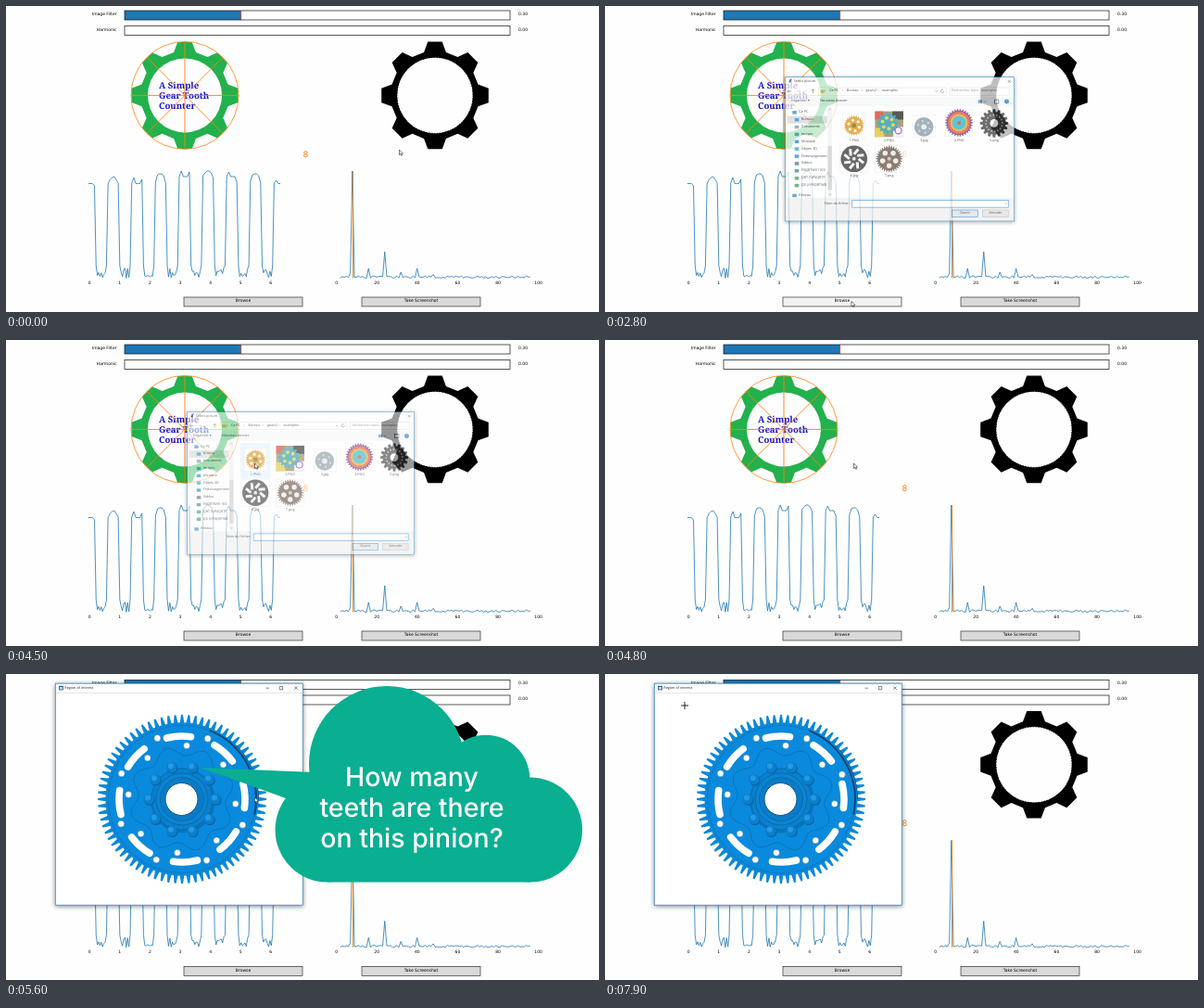
Animation of 640 by 330 pixels, one loop 8 s. Source, as an HTML page:

```html
<!DOCTYPE html>
<html lang="en">
<head>
<meta charset="utf-8">
<title>Gear tooth counter</title>
<style>
  html, body { margin: 0; width: 100%; height: 100%; overflow: hidden; background: #fefefe; }
  svg { display: block; width: 100%; height: 100%; }
  text { dominant-baseline: central; text-rendering: geometricPrecision; }
  .plot { font: 4.5px "DejaVu Sans", sans-serif; }
  .ui { font: 3.8px "Open Sans", sans-serif; fill: #222; }
  .mid { text-anchor: middle; }
  .end { text-anchor: end; }
  .logo { font: 900 9.6px "Noto Serif", serif; fill: #1414c4; }
  .speech { font: 500 28.5px Inter, sans-serif; fill: #fff; text-anchor: middle; }
  .shadow { filter: drop-shadow(.6px 1.2px 2.4px #0007); }
</style>
</head>
<body>
<svg id="stage" viewBox="0 0 640 330"></svg>
<script>
const BLUE = '#1f77b4', ORANGE = '#ff7f0e', GEAR = '#0b88d8', DEEP = '#0a65a8';

// Shape helpers, each returning SVG markup
const range = n => [...Array(n).keys()];
const each = (n, draw) => range(n).map(draw).join('');
const rand = i => { const s = Math.sin(i * 127.1 + 3) * 43758.5; return s - Math.floor(s); };
const polar = (x, y, r, deg) => {
  const a = deg * Math.PI / 180;
  return [x + r * Math.cos(a), y + r * Math.sin(a)].map(v => +v.toFixed(2));
};
const text = (x, y, s, cls, more = '') => `<text x="${x}" y="${y}" class="${cls}" ${more}>${s}</text>`;
const rect = (x, y, w, h, fill, more = '') =>
  `<rect x="${x}" y="${y}" width="${w}" height="${h}" fill="${fill}" ${more}/>`;
const disc = (x, y, r, fill, more = '') => `<circle cx="${x}" cy="${y}" r="${r}" fill="${fill}" ${more}/>`;
const path = (d, fill, stroke = 'none', width = .6, more = '') =>
  `<path d="${d}" fill="${fill}" stroke="${stroke}" stroke-width="${width}" ${more}/>`;
const line = (points, stroke, width) => path('M' + points.join('L'), 'none', stroke, width, 'stroke-linejoin="round"');
const outline = (color, width = .6) => `stroke="${color}" stroke-width="${width}"`;
const arc = (x, y, r, from, to) => `M${polar(x, y, r, from)}A${r} ${r} 0 0 1 ${polar(x, y, r, to)}`;

// base and tip are half tooth widths as fractions of the pitch
function gear(x, y, teeth, root, top, base, tip, fill) {
  const pitch = 360 / teeth;
  const points = range(teeth).flatMap(i =>
    [[root, -base], [top, -tip], [top, tip], [root, base]].map(([r, f]) => polar(x, y, r, (i + f) * pitch)));
  return path(`M${points.join('L')}Z`, fill);
}

function slider(y, label, value, fraction) {
  const end = 128 + 416 * fraction;
  return rect(128, y, 416, 10, '#fff') +
    rect(128, y, 416 * fraction, 10, BLUE) +
    (fraction ? line([[end, y], [end, y + 10]], '#e02010', .7) : '') +
    rect(128, y, 416, 10, 'none', outline('#111', .7)) +
    text(119.5, y + 4.5, label, 'plot end') + text(553, y + 4.5, value, 'plot');
}

const button = (x, label, id) =>
  rect(x, 314, 128, 10, '#d9d9d9', `id="${id}" ${outline('#111')}`) + text(x + 64, 318.8, label, 'plot mid');

function toothSignal() {
  const tops = [
    [0, 0, 191.5, 191.5, 191.5, 194], [192, 187, 185, 184, 187, 191], [191, 185, 191.5, 191.5, 191.5, 187],
    [190, 182, 181, 181, 183, 191], [184, 178, 184, 184, 184, 179], [183, 180, 178, 178, 180, 185],
    [184, 179, 184, 184, 184, 190], [189, 182, 181, 181, 183, 191], [191, 188, 191.5, 191.5, 0, 0]];
  const period = 204.9 / 8;
  return tops.flatMap((ys, k) => {
    const x = 90 + k * period;
    const high = ys.map((y, j) => [x + (j - 2.5) * 2.2, y]).filter(p => p[1]);
    const low = k === 8 ? [] : range(9).map(j =>
      [x + period / 2 + (j - 4) * 1.4, j % 8 ? 282 + 11.5 * rand(k * 9 + j) : 280]);
    return [...high, ...low];
  });
}

function spectrum() {
  const spikes = { 7: 5, 8: 115.5, 16: 10.5, 24: 28.5, 32: 6.5, 40: 10.5, 48: 4 };
  return range(95).map(i => [356.4 + (i + 2) * 2.181, 293.5 - (spikes[i + 2] ?? 2.6 * rand(i) ** 1.5)]);
}

function page() {
  const [lx, rx, y] = [193, 463, 96.4];
  return slider(5, 'Image Filter', '0.30', .302) + slider(21.6, 'Harmonic', '0.00', 0) +
    gear(lx, y, 8, 48, 58, .32, .17, '#22b14c') + disc(lx, y, 40, '#fefefe') +
    text(165, 85.5, 'A Simple', 'logo') + text(165, 96.3, 'Gear Tooth', 'logo') + text(165, 107, 'Counter', 'logo') +
    disc(lx, y, 58, 'none', outline(ORANGE, .8)) +
    each(8, i => line([[lx, y], polar(lx, y, 58, i * 45)], ORANGE, .9)) +
    gear(rx, y, 8, 48, 58.3, .32, .17, '#000') +
    disc(rx, y, 41, '#fefefe', outline('#000', .9) + ' stroke-dasharray="1.6 1.3"') +
    text(323.3, 161, '8', 'plot mid', `fill="${ORANGE}" style="font-size:9px"`) +
    line(toothSignal(), BLUE, .8) + line(spectrum(), BLUE, .8) +
    line([[374.5, 178], [374.5, 293.5]], ORANGE, .9) +
    each(7, i => text(90.2 + i * 32.6, 299, i, 'plot mid')) +
    each(6, i => text(356.6 + i * 43.6, 299, i * 20, 'plot mid')) +
    button(192, 'Browse', 'browse') + button(384, 'Take Screenshot', 'shot');
}

function thumbnails() {
  const ring = (x, y, n, r, size, fill) => each(n, i => disc(...polar(x, y, r, i * 360 / n + 18), size, fill));
  const frame = (x, y, w, h) => rect(x - w / 2, y - h / 2, w, h, '#fff', outline('#ddd', .4));
  return frame(268, 128.5, 25, 25) + gear(268, 128.5, 24, 9.5, 11, .3, .15, '#d8941c') +
    ring(268, 128.5, 6, 6, 1.7, '#fff3d0') + disc(268, 128.5, 2.5, '#8a5a10') +
    rect(291, 113, 31, 28, '#8d8350') + rect(291, 113, 9, 9, '#d33a22') + rect(310, 113, 12, 9, '#222') +
    rect(291, 131, 10, 10, '#e7c02b') + rect(311, 130, 11, 11, '#f3f0fa') +
    gear(305, 126, 16, 10, 12, .3, .15, '#2195a5') + ring(305, 126, 6, 6, 2, '#d8c840') +
    disc(316.5, 134, 3.6, 'none', outline('#8640c8', 1.2)) +
    frame(345, 129, 25, 24) + disc(344.5, 130, 10.5, '#8799a3') + ring(344.5, 130, 6, 6.5, 1.1, '#c9d4d8') +
    disc(344.5, 130, 3, '#dfe7ea') +
    frame(383, 125.5, 30, 30) + gear(383, 125.5, 30, 13.5, 15, .3, .2, '#793680') +
    disc(383, 125.5, 12, '#e3552b') + disc(383, 125.5, 9.5, '#e7a52e') + disc(383, 125.5, 7.5, '#27b4c4') +
    disc(383, 125.5, 2, '#c5463a') +
    gear(421.5, 126, 16, 12.5, 15.5, .38, .2, '#3d3d3d') + ring(421.5, 126, 16, 9, 1, '#aaa') +
    disc(421.5, 126, 4.5, '#fff') +
    frame(268, 165, 31, 30) + disc(268, 165, 14.5, '#373737') +
    each(8, i => line([polar(268, 165, 5, i * 45), polar(268, 165, 11.5, i * 45 + 24)], '#f2f2f2', 3)) +
    disc(268, 165, 2, '#ddd') +
    frame(306.5, 165, 31, 30) + gear(306.5, 165, 32, 12.6, 14.5, .3, .17, '#675246') +
    ring(306.5, 165, 5, 7.5, 2.8, '#efe9e4') + disc(306.5, 165, 2, '#c9bcb0');
}

function dialog() {
  const places = ['Ce PC', 'Bureau', 'Documents', 'Images', 'Musique', 'Objets 3D', 'Téléchargements', 'Vidéos',
    'PXQRTWV1103', 'QRT (\\\\PXQRTF', 'QS (\\\\PXQRTWD', 'Réseau'];
  const tints = ['#3a8fc4', '#1a8fe0', '#7a98a8', '#58a8c8', '#1b86d8', '#28b0d0', '#2a88d8', '#5a6f8a',
    '#408a9a', '#4a9a60', '#4a9a60', '#3a8fc4'];
  const files = ['1.PNG', '2.PNG', '3.jpg', '4.PNG', '5.png', '6.jpg', '7.png'];
  const crumbs = [['Ce PC', 241], ['Bureau', 260], ['gears2', 281], ['examples', 299]];
  const place = (name, i) => {
    const y = 114.2 + i * 8 + (i === 11 ? 3 : 0), indent = i % 11 ? 2.5 : 0;
    return rect(200.5 + indent, y - 1.8, 4.6, 3.6, tints[i]) + text(207.7 + indent, y, name, 'ui');
  };
  const tail = (x, label, edge) =>
    rect(x, 221, 28, 7.6, '#e1e1e1', outline(edge)) + text(x + 14, 224.6, label, 'ui mid');
  return rect(192.5, 75.5, 251, 157.5, '#fff', `class="shadow" ${outline('#2583b8', .8)}`) +
    path('M196.500 82l1-4 2.500-1-1 3.500z', '#28456c') + text(202, 80.3, 'Select picture', 'ui') +
    path('M436.600 78.800l3 3m0-3l-3 3', 'none', '#222', .5) +
    path('M199.500 91h-4m1.500-1.500l-1.500 1.500 1.500 1.500M223 93.300v-4.500m-1.500 1.500l1.500-1.500 1.500 1.500', 'none', '#444', .6) +
    path('M205 91h4m-1.500-1.500l1.500 1.500-1.500 1.500M214 90.400l1 1 1-1', 'none', '#aaa', .5) +
    rect(229, 87, 140, 8.300, '#fff', outline('#d5d5d5', .5)) + rect(231, 89.500, 4.500, 3.500, '#f0c453') +
    crumbs.map(([name, x]) => text(x - 5, 91, '›', 'ui') + text(x, 91, name, 'ui')).join('') +
    path('M357 90.300l1.200 1.200 1.200-1.200', 'none', '#555', .5) + path('M366 89.500a1.700 1.700 0 1 0 .600 1.500', 'none', '#444', .5) +
    rect(373, 87, 65, 8.300, '#fff', outline('#d5d5d5', .5)) +
    text(375, 91, 'Rechercher dans : examples', 'ui', 'style="fill:#777"') +
    rect(193, 97, 250, 10.500, '#f5f6f7') + text(199, 102.200, 'Organiser ▾', 'ui') + text(231, 102.200, 'Nouveau dossier', 'ui') +
    rect(404, 100.500, 4, 3.500, '#4f91c0') + path('M410.500 101.800l1 1 1-1', 'none', '#444', .5) +
    rect(422, 100.300, 4.500, 4, '#fff', outline('#345', .6)) + disc(435.300, 102.300, 2.500, '#0a6fc2') +
    text(435.300, 102.300, '?', 'ui mid', 'style="fill:#fff"') +
    rect(195, 118.200, 44, 8, '#d9d9d9') + places.map(place).join('') +
    rect(239, 108, 204, 99.500, '#fff') + rect(239.300, 108, 4.400, 99.500, '#f0f0f0') + rect(239.300, 151, 4.400, 48, '#cdcdcd') +
    path('M240.400 111.500l1.100-1 1.100 1M240.400 203.500l1.100 1 1.100-1', 'none', '#555', .5) +
    rect(251.500, 110, 33, 39.500, '#e5f3ff', 'id="hoverTop"') + rect(251.500, 149.500, 33, 38, '#e5f3ff', 'id="hoverLow"') +
    thumbnails() +
    files.map((name, i) => text(268 + i % 5 * 38.400, i < 5 ? 145.500 : 184, name, 'ui mid')).join('') +
    rect(193, 207.500, 250, 25, '#f0f0f0') + text(264, 214.300, 'Nom du fichier :', 'ui end') +
    rect(266, 210.300, 171, 7.800, '#fff', outline('#0078d7')) + path('M433.500 213.500l1 1 1-1', 'none', '#444', .5) +
    tail(375.500, 'Ouvrir', '#0078d7') + tail(409, 'Annuler', '#adadad');
}

function pinion() {
  const [x, y] = [190, 133.6];
  const scallop = range(181).map(i => polar(x, y, 52 + 5 * Math.cos((i * 2 - 27) * 8 * Math.PI / 180), i * 2));
  return gear(x, y, 76, 82.5, 91, .34, .13, GEAR) +
    disc(x, y, 79.5, '#0a8add', outline('#0a72ba', .7)) +
    path(arc(x, y, 80, -68, 12), 'none', '#0b4674', 2) + path(arc(x, y, 82.5, -45, 0), 'none', '#0a5a94', 1) +
    line(scallop, DEEP, .6) +
    each(8, i => path(arc(x, y, 68, i * 45 - 14, i * 45 + 8), 'none', '#fff', 7.6, 'stroke-linecap="round"') +
      disc(...polar(x, y, 58, i * 45 + 5), 3.5, '#fff', outline(DEEP, .5)) +
      disc(...polar(x, y, 71, i * 45 + 23), 3.6, '#fff', outline(DEEP, .5))) +
    disc(x + 1, y + 1.5, 35, '#0973bb') + disc(x, y, 33, '#0a80cc', outline(DEEP, .7)) +
    each(10, i => {
      const [bx, by] = polar(x, y, 36, i * 36);
      return disc(bx + .8, by + 1, 6, DEEP) + disc(bx, by, 5.7, '#0b7fcb') + disc(bx - 1, by - 1.5, 3, '#249ae4');
    }) +
    disc(x, y, 28, '#0b84d1', outline(DEEP, .8)) + disc(x, y, 23.5, '#0a7bc5', outline(DEEP, .7)) +
    disc(x - .5, y, 17.5, '#fff', outline('#0a568f', 1));
}

const regionWindow = () =>
  rect(53.3, 8.8, 267, 239, '#fff', `class="shadow" ${outline('#3b87b5', .8)}`) +
  rect(54, 18.6, 265.8, .5, '#ccc') +
  rect(57, 11.4, 5, 4.6, '#2d5f86') + rect(57.8, 12.6, 3.4, 2.6, '#bcd8e8') +
  text(63.3, 13.8, 'Region of interest', 'ui') +
  path('M280.500 13.800h3.500M295.300 12h3.400v3.400h-3.400zM311.300 12l3.400 3.400m0-3.400l-3.400 3.400', 'none', '#222', .55) +
  pinion();

const callout = () => `<g fill="#0aae90">` +
  path('M210 101L345 106.500V149.500z', '#0aae90') +
  disc(411, 97, 84, '#0aae90') + disc(518, 113, 47.3, '#0aae90') +
  disc(347, 168, 56.5, '#0aae90') + disc(565.5, 168, 56.5, '#0aae90') +
  rect(347, 111.5, 218.5, 113, '#0aae90') + '</g>' +
  ['How many', 'teeth are there', 'on this pinion?'].map((s, i) =>
    text(438, 120.5 + i * 33.3, s, 'speech', 'style="dominant-baseline:auto"')).join('');

const $ = id => document.getElementById(id);
$('stage').innerHTML =
  `<g id="page">${page()}<g id="dialog">${dialog()}</g><g id="window">${regionWindow()}</g></g>
   <g id="pointer">
     ${path('M0 0v5.600l1.300-1.200 .9 2 .9-.4-.9-1.900h1.800z', '#fff', '#23233c', .6, 'id="arrow"')}
     ${path('M-4 0h8M0 -4v8', 'none', '#111', .9, 'id="cross"')}
   </g>
   <g id="callout">${callout()}</g>`;

// Pointer stops: time, x, y
const stops = [[800, 424.5, 155], [1700, 268, 312], [1900, 266, 318.5], [3100, 266, 318.5], [4000, 265.5, 139.5],
  [4100, 268.5, 133], [6900, 268.5, 133], [7000, 269, 134.5], [7200, 269, 134.5], [7300, 224, 112],
  [7500, 224, 112], [7900, 86, 34]];
const LOOP = 8000, STEP = 100;

const ramp = (t, from, to) => Math.min(1, Math.max(0, (t - from) / (to - from)));
const easeOut = p => 1 - (1 - p) ** 2;

function pointerAt(t) {
  const next = stops.findIndex(s => s[0] > t);
  if (next === 0) return stops[0].slice(1);
  if (next < 0) return stops.at(-1).slice(1);
  const [a, b] = [stops[next - 1], stops[next]];
  const p = easeOut(ramp(t, a[0], b[0]));
  return [1, 2].map(k => a[k] + (b[k] - a[k]) * p);
}

const show = (id, visible) => $(id).setAttribute('visibility', visible ? 'visible' : 'hidden');

function popup(id, amount, x, y, shrink) {
  const scale = 1 - shrink * (1 - amount);
  $(id).setAttribute('opacity', amount);
  $(id).setAttribute('transform', `translate(${x} ${y}) scale(${scale}) translate(${-x} ${-y})`);
}

function render(now) {
  const t = Math.floor(now % LOOP / STEP) * STEP;
  const [x, y] = pointerAt(t);
  $('page').setAttribute('transform', `translate(0 ${1.4 * ramp(t, 5300, 5600)})`);
  $('browse').setAttribute('fill', t >= 1800 && t < 3200 ? '#f2f2f2' : '#d9d9d9');
  popup('dialog', easeOut(ramp(t, 2600, 3000)) * (1 - ramp(t, 4300, 4800)), 318, 154, .06);
  popup('window', easeOut(ramp(t, 4900, 5200)), 187, 128, .04);
  $('callout').setAttribute('opacity', ramp(t, 5300, 5600) * (1 - ramp(t, 7500, 7900)));
  $('pointer').setAttribute('transform', `translate(${x} ${y})`);
  show('arrow', t < 7000);
  show('cross', t >= 7000);
  show('hoverTop', t > 3200 && y < 149.5);
  show('hoverLow', t > 3200 && y >= 149.5 && y < 187.5);
}

const start = performance.now();
(function tick() {
  render(performance.now() - start);
  requestAnimationFrame(tick);
})();
</script>
</body>
</html>
```
